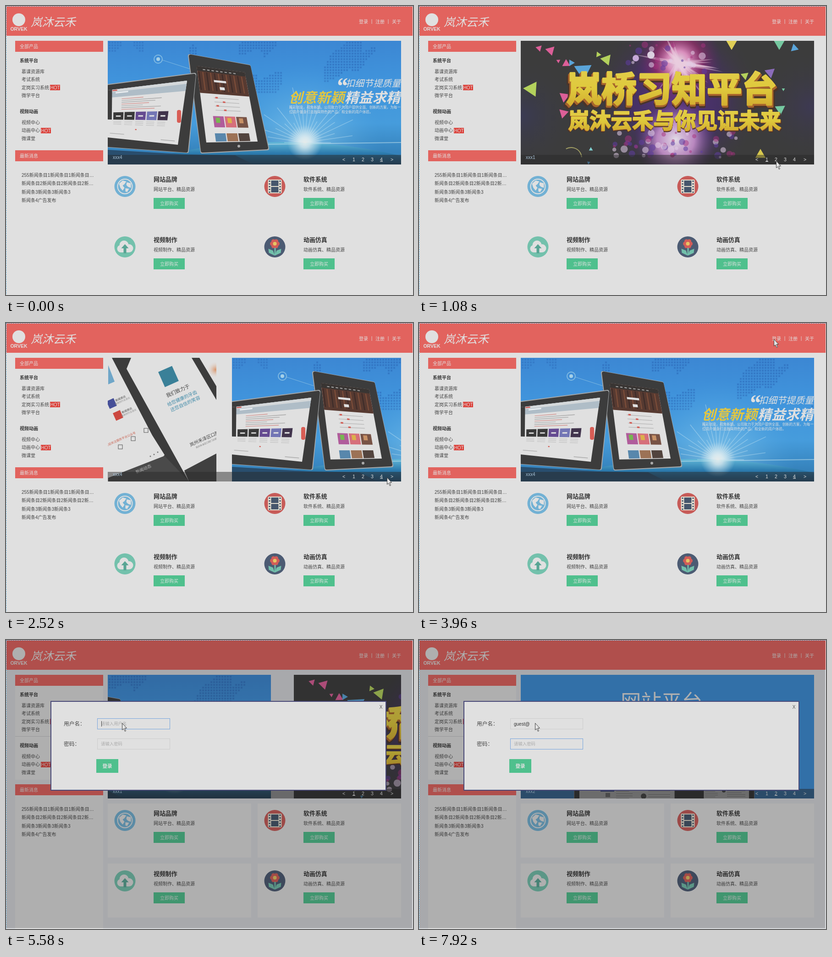
Write an HTML page with a canvas that moves like this. It is 888 px wide and 631 px high and loops after 8000 ms.

```html
<!DOCTYPE html>
<html lang="zh">
<head>
<meta charset="utf-8">
<title>网站首页</title>
<style>
html, body { margin: 0; width: 100%; height: 100%; overflow: hidden; background: #e0e0e0; }
canvas { display: block; }
</style>
</head>
<body>
<canvas id="stage" width="888" height="631"></canvas>
<script>
const c = document.getElementById('stage').getContext('2d');
const SANS = '"Liberation Sans", "Noto Sans CJK SC", "Noto Sans CJK", sans-serif';
const LIGHT = '#e0e0e0', DARK = '#3c3c3c', RED = '#e2635e', GREEN = '#4fc08d';
const LOOP = 8000, STEP = 180;

function rect(x, y, w, h, color) { c.fillStyle = color; c.fillRect(x, y, w, h); }
function round(x, y, w, h, r, color) {
  c.beginPath(); c.roundRect(x, y, w, h, r); c.fillStyle = color; c.fill();
}
function disc(x, y, r, color) {
  c.beginPath(); c.arc(x, y, r, 0, 7); c.fillStyle = color; c.fill();
}
function poly(pts, color) {
  c.beginPath();
  for (let i = 0; i < pts.length; i += 2) c.lineTo(pts[i], pts[i + 1]);
  c.closePath(); c.fillStyle = color; c.fill();
}
function line(x1, y1, x2, y2, color, w = 1) {
  c.beginPath(); c.moveTo(x1, y1); c.lineTo(x2, y2);
  c.strokeStyle = color; c.lineWidth = w; c.stroke();
}
// x is the left edge or centre, y the middle of the glyphs
function text(s, x, y, size, color, style = '', align = 'left') {
  c.font = `${style} ${size}px ${SANS}`;
  c.textAlign = align; c.fillStyle = color;
  c.fillText(s, x, Math.round(y + size * .37));
}
function tilted(s, x, y, size, color, angle, style) {
  c.save(); c.translate(x, y); c.rotate(angle);
  text(s, 0, 0, size, color, style, 'center');
  c.restore();
}
function glow(x, y, r, stops) {
  const g = c.createRadialGradient(x, y, 0, x, y, r);
  stops.forEach(([p, col]) => g.addColorStop(p, col));
  disc(x, y, r, g);
}
function fade(y1, y2, ...cols) {
  const g = c.createLinearGradient(0, y1, 0, y2);
  cols.forEach((col, i) => g.addColorStop(i / (cols.length - 1), col));
  return g;
}
function random(seed) {
  return () => (seed = (seed * 16807) % 2147483647) / 2147483647;
}
// patches in the unit square of a four-cornered screen
function screen([ax, ay, bx, by, cx, cy, dx, dy]) {
  const at = (u, v) => [
    (ax * (1 - u) + bx * u) * (1 - v) + (dx * (1 - u) + cx * u) * v,
    (ay * (1 - u) + by * u) * (1 - v) + (dy * (1 - u) + cy * u) * v];
  return (u, v, w, h, color) =>
    poly([...at(u, v), ...at(u + w, v), ...at(u + w, v + h), ...at(u, v + h)], color);
}
function tablet(pts, color) {
  poly(pts, color);
  c.lineJoin = 'round'; c.lineWidth = 8; c.strokeStyle = color; c.stroke();
}

// heavy extruded lettering, its sides leaning to the middle
function gold(s, x, y, size, depth) {
  c.lineJoin = 'round';
  for (let i = depth; i >= 0; i--) {
    const side = i > depth / 2 ? '#4b352b' : '#a8652c';
    const color = i ? side : fade(y - size / 2, y + size / 2, '#e2cc48', '#dfc93c', '#d2ac30');
    [...s].forEach((ch, n) => {
      const cx = x + n * size, px = cx + (cx + size / 2 - 556) * .002 * i, py = y + i * .5;
      text(ch, px, py, size, color, '900');
      c.strokeStyle = color; c.lineWidth = size / 22;
      c.strokeText(ch, px, Math.round(py + size * .37));
    });
  }
}
function tri(x, y, r, angle, color) {
  const pts = [];
  for (let i = 0; i < 3; i++) {
    const a = angle + i * 2.094;
    pts.push(x + r * Math.cos(a), y + r * Math.sin(a));
  }
  poly(pts, color);
}

function slideParty() {
  rect(222, 76, 640, 270, DARK);
  glow(225, 240, 130, [[0, 'rgba(58,58,92,.7)'], [1, 'rgba(60,60,60,0)']]);
  glow(855, 220, 130, [[0, 'rgba(62,56,92,.7)'], [1, 'rgba(60,60,60,0)']]);
  glow(560, 205, 190, [[0, 'rgba(92,52,130,.9)'], [.5, 'rgba(72,46,112,.75)'], [1, 'rgba(60,60,60,0)']]);
  glow(566, 122, 95, [[0, '#e4dde4'], [.25, '#d98fbd'], [.55, 'rgba(165,45,110,.6)'], [1, 'rgba(80,40,110,0)']]);
  glow(560, 292, 90, [[0, '#e2dce6'], [.45, 'rgba(205,150,208,.85)'], [1, 'rgba(90,50,130,0)']]);
  const rnd = random(77);
  for (let i = 0; i < 26; i++) {
    const a = rnd() * 6.28, r = 30 + rnd() * 70, x = 566, y = 124;
    poly([x + 5 * Math.sin(a), y - 5 * Math.cos(a), x + r * Math.cos(a), y + r * Math.sin(a), x - 5 * Math.sin(a), y + 5 * Math.cos(a)], 'rgba(232,205,222,.45)');
  }
  for (let i = 0; i < 80; i++) {
    const low = i > 24, x = low ? 425 + rnd() * 270 : 455 + rnd() * 170;
    const y = low ? 274 + rnd() * 56 : 84 + rnd() * 60;
    disc(x, y, 2 + rnd() * 6, ['rgba(225,205,232,.55)', 'rgba(165,50,125,.5)', 'rgba(95,60,160,.55)'][i % 3]);
  }
  disc(506, 107, 8, '#dcd0e0'); disc(473, 114, 7, '#c6aad8');
  const pink = '#dc5f98', lime = '#b3d15c', blue = '#5aa5da', mint = '#75c8a0';
  tri(262, 92, 8, 3.4, pink); tri(287, 97, 12, 5.5, pink); tri(304, 120, 5, 3.6, pink);
  tri(321, 126, 10, 2.6, pink); tri(332, 124, 8, 0, blue); tri(391, 106, 7, 2.2, lime);
  tri(409, 117, 14, 5.4, lime); tri(246, 181, 19, 5.3, lime); tri(358, 141, 22, 5.7, blue);
  tri(317, 198, 13, 3.8, pink); tri(315, 234, 12, 3.9, pink); tri(375, 313, 5, .5, '#7fd0d0');
  tri(682, 81, 15, 1.57, '#e0cf56'); tri(786, 82, 14, 1.57, mint); tri(819, 92, 10, 4.5, blue);
  tri(766, 145, 13, 3.5, '#8b6cba'); tri(788, 225, 13, 3.6, mint); tri(711, 152, 10, 5.6, lime);
  tri(745, 325, 13, 4.71, '#d8c94e'); tri(795, 182, 4, 1.57, mint); tri(370, 342, 4, 3.8, blue);
  c.beginPath(); c.arc(332, 332, 23, 4.2, 6.2); c.strokeStyle = '#a3a064'; c.lineWidth = 2; c.stroke();
  gold('岚桥习知平台', 322, 181, 76.5, 16);
  gold('岚沐云禾与你见证未来', 326, 250, 46.4, 5);
}

function spaceHead(x, y, w, h) {
  c.save(); c.beginPath(); c.rect(x, y, w, h); c.clip();
  rect(x, y, w, h, '#343238');
  const k = w / 341, rnd = random(19);
  glow(x + w * .3, y + h * .4, w * .22, [[0, 'rgba(75,60,95,.7)'], [1, 'rgba(50,50,50,0)']]);
  for (let i = 0; i < 50; i++) rect(x + rnd() * w, y + rnd() * h, 1, 1, '#8087a0');
  line(x + 60 * k, y + 30 * k, x + 290 * k, y + 8 * k, '#7a4550');
  disc(x + 66 * k, y + 72 * k, 26 * k, '#c98257');
  disc(x + 58 * k, y + 66 * k, 17 * k, '#dda476');
  c.beginPath(); c.ellipse(x + 75 * k, y + 38 * k, 22 * k, 12 * k, .75, 0, 7); c.fillStyle = '#4f94ce'; c.fill();
  line(x + 75 * k, y + 38 * k, x + 92 * k, y + 24 * k, LIGHT);
  poly([x + 155 * k, y + 55 * k, x + 185 * k, y + 27 * k, x + 218 * k, y + 42 * k, x + 235 * k, y + 72 * k, x + 175 * k, y + 74 * k], '#2d59a6');
  poly([x + 165 * k, y + 58 * k, x + 185 * k, y + 33 * k, x + 202 * k, y + 68 * k], '#4d87c9');
  poly([x + 270 * k, y + 9 * k, x + 308 * k, y + 2 * k, x + 300 * k, y + 15 * k, x + 276 * k, y + 20 * k], '#4d8c91');
  disc(x + 299 * k, y + 7 * k, 4 * k, '#d2ae47');
  disc(x + 52 * k, y + 12 * k, 10 * k, LIGHT);
  text('岚泽大学', x + 65 * k, y + 12 * k, 9 * k, LIGHT, 'bold');
  text('通信原理', x + 170 * k, y + 40 * k, 14 * k, '#62c653', 'bold');
  rect(x, y + 69 * k, w, 10 * k, '#2d2d30');
  for (let i = 0; i < 9; i++) text(['首页', '公告栏', '课程简介', '教学团队'][Math.min(i, 3)], x + (42 + i * 25) * k, y + 73 * k, 5 * k, LIGHT, 'bold');
  c.restore();
}

function paragraph(x, y, w, rows, gap = 5) {
  for (let i = 0; i < rows; i++) rect(x, y + i * gap, w * (i % 3 == 2 ? .8 : 1), 1, '#a0a0a0');
}

function slideSite() {
  rect(222, 76, 640, 270, '#3d8ed7');
  text('网站平台', 529, 135, 44.5, LIGHT, '300', 'center');
  text('专业是一枚优胜的标签，技术力量是获得认可的基础，效率是完成任务的保障，尽心是对客户的负责，成果是合作的意义。', 304, 170, 8.28, LIGHT);
  round(338, 189, 364, 180, 14, '#9a9da2');
  round(339, 190, 362, 180, 13, DARK);
  rect(350, 204, 340, 150, LIGHT);
  spaceHead(349, 204, 341, 79);
  ['课程简介', '公告新闻', '教学资源'].forEach((s, i) => {
    const x = 396 + i * 88;
    rect(x, 294, 3, 3, '#53b45a'); text(s, x + 4, 296, 4.5, '#555');
  });
  rect(396, 304, 30, 27, '#3c4f9f');
  text('通信原理', 411, 315, 5, LIGHT, 'bold', 'center');
  paragraph(430, 305, 36, 9);
  disc(490, 318, 6, '#555'); paragraph(500, 314, 48, 4);
  disc(490, 341, 6, '#555'); paragraph(500, 337, 48, 3);
  rect(407, 334, 10, 9, '#888');
  round(585, 239, 147, 120, 9, '#9a9da2');
  round(586, 240, 145, 120, 8, DARK);
  rect(596, 254, 124, 100, LIGHT);
  spaceHead(595, 254, 126, 56);
  paragraph(624, 322, 28, 6, 4);
  disc(665, 329, 4, '#555'); paragraph(672, 325, 40, 5, 4);
  round(557, 314, 65, 50, 9, '#a0a0a0');
  round(558, 315, 63, 50, 8, DARK);
}

function slidePhone() {
  rect(222, 76, 640, 270, LIGHT);
  c.save(); c.translate(404, 0);
  poly([-182, 76, -60, 76, 80, 346, -182, 346], '#c4c5c6');
  poly([222, 92, 236, 128, 222, 134], '#6fa6c8');
  poly([230, 76, 272, 76, 262, 100, 398, 346, 300, 346, 345, 288, 318, 245], DARK);
  poly([222, 338, 345, 290, 398, 346, 222, 346], '#4a4a4a');
  poly([264, 98, 322, 76, 408, 76, 458, 160, 458, 285, 388, 322], LIGHT);
  poly([404, 76, 421, 76, 458, 138, 458, 168], DARK);
  poly([388, 322, 458, 285, 458, 346, 398, 346], '#404040');
  glow(456, 102, 18, [[0, '#d9966c'], [1, 'rgba(224,215,210,0)']]);
  const a = -.42;
  c.save(); c.translate(353, 117); c.rotate(a); rect(-16, -18, 33, 36, '#3a8098'); c.restore();
  tilted('我们致力于', 374, 148, 11, '#444', a);
  tilted('给您健康的牙齿', 383, 164, 10, '#3f8aa8', a);
  tilted('还您自信的笑容', 390, 176, 10, '#3f8aa8', a);
  tilted('岚州禾泽区口腔', 432, 252, 10, '#444', a);
  tilted('岚州禾泽区口腔门诊部', 436, 262, 5, '#777', a);
  for (const [x, y, col] of [[229, 176, '#454f98'], [243, 202, '#cc4840']]) {
    c.save(); c.translate(x, y); c.rotate(a); rect(-8, -9, 17, 18, col); c.restore();
    tilted('新闻资讯', x + 20, y - 11, 6, '#444', a);
    tilted('最新的行业资讯', x + 24, y - 6, 5, '#888', a);
  }
  tilted('欢迎关注服务平台公众号', 249, 254, 6.5, '#c9604f', a);
  c.strokeStyle = '#555'; c.lineWidth = 1;
  for (let i = 0; i < 3; i++) c.strokeRect(244 + i * 28, 266 - i * 18, 9, 9);
  tilted('新闻动态', 299, 319, 9, '#bbb', a);
  disc(314, 291, 1.5, '#777'); disc(322, 287, 1.5, '#777'); disc(330, 282, 1.5, '#777');
  c.restore();
}

function slideTablet() {
  rect(222, 76, 640, 270, fade(76, 346, '#3c87d3', '#4094dc', '#469cdc', '#2f78ae'));
  for (let x = 400; x < 862; x += 6) {
    for (let y = 78; y < 190; y += 6) {
      if (Math.sin(x * .035 + 1) + Math.sin(y * .05 + x * .02) + Math.sin(x * .11 + y * .08) * .5 > .65) rect(x, y, 4, 4, 'rgba(40,100,180,.45)');
    }
  }
  for (let x = 224; x < 300; x += 6) for (let y = 78; y < 120; y += 6) {
    if (Math.sin(x * .09) + Math.sin(y * .1) > .5) rect(x, y, 4, 4, 'rgba(40,100,180,.35)');
  }
  glow(652, 297, 170, [[0, 'rgba(215,235,243,.8)'], [.25, 'rgba(140,203,236,.5)'], [1, 'rgba(80,165,225,0)']]);
  c.beginPath(); c.ellipse(600, 560, 560, 263, 0, 0, 7);
  c.fillStyle = fade(297, 346, '#62b7d8', '#2c7bae', '#214d70'); c.fill();
  for (let i = 0; i < 22; i++) {
    const a = Math.PI + i * .15, r = 45 + (i * 37 % 85);
    line(652, 298, 652 + r * Math.cos(a), 298 + r * Math.sin(a), 'rgba(220,240,245,.35)', 1.5);
  }
  glow(652, 298, 38, [[0, '#e4eaea'], [.3, 'rgba(222,236,240,.8)'], [1, 'rgba(200,230,240,0)']]);
  line(560, 302, 862, 298, 'rgba(210,235,240,.5)', 2);
  poly([222, 314, 390, 324, 500, 326, 540, 346, 222, 346], '#294e6e');
  c.beginPath(); c.arc(332, 116, 9, 0, 7); c.strokeStyle = '#80bae2'; c.lineWidth = 2; c.stroke();
  disc(332, 116, 4, '#a5d0e8'); line(341, 118, 400, 137, '#80bae2');

  tablet([401, 109, 530, 132, 570, 311, 428, 318], '#a5a8aa');
  tablet([403, 110, 530, 133, 568, 309, 429, 316], DARK);
  let p = screen([416, 131, 521, 145, 549, 296, 437, 298]);
  p(0, 0, 1, 1, LIGHT); p(0, 0, 1, .35, '#573a31'); p(0, 0, 1, .06, '#393533');
  for (let i = 0; i < 12; i++) p(.02 + i * .08, .07, .025, .24, i % 2 ? '#7a4c39' : '#3f2d2a');
  for (let i = 0; i < 8; i++) p(.12 + i * .09, .03, .05, .012, '#aaa');
  p(.32, .16, .25, .03, LIGHT); p(.42, .25, .1, .04, LIGHT);
  for (let i = 0; i < 4; i++) { p(.27, .4 + i * .055, .5, .008, '#b5b5b5'); p(.3 + i % 2 * .14, .39 + i * .055, .05, .02, '#d25a52'); }
  ['#b05c9b', '#d66f7b', '#785346'].forEach((col, i) => { p(.2 + i * .23, .65, .21, .15, col); p(.25 + i * .23, .67, .08, .07, ['#77b851', '#dbb14b', '#c79166'][i]); });
  ['#5887ac', '#9c7256', '#52443e'].forEach((col, i) => p(.19 + i * .23, .88, .21, .11, col));
  disc(508, 306, 3, '#aaa');

  tablet([210, 176, 411, 150, 395, 317, 210, 304], '#a5a8aa');
  tablet([210, 178, 410, 152, 393, 316, 210, 303], DARK);
  p = screen([222, 184, 395, 163, 375, 303, 222, 287]);
  p(0, 0, 1, 1, LIGHT); p(.05, 0, .95, .16, '#afbdc7'); p(.05, 0, .95, .05, '#d4d8da');
  p(0, 0, .055, .62, DARK); p(.1, .06, .16, .025, '#edf0f2'); p(.06, .01, .06, .02, '#c9504b');
  for (let i = 0; i < 7; i++) p(.18, .2 + i * .035, .28 + i * 7 % 4 * .08, .01, i % 3 ? '#a5a5a5' : '#cf8580');
  ['#393939', '#393939', '#654b91', '#7376b5', '#41344c'].forEach((col, i) => {
    p(.075 + i * .15, .47, .135, .15, col); p(.11 + i * .15, .535, .065, .025, LIGHT);
    for (let j = 0; j < 3; j++) p(.075 + i * .15, .65 + j * .03, .11, .008, '#bbb');
  });
  p(.38, .79, .02, .02, '#d25a52'); p(.03, .9, .2, .012, '#aaa'); p(.75, .94, .2, .012, '#aaa');
  round(373, 227, 9, 28, 4, '#d85d55');

  c.font = 'italic bold 50px "Liberation Serif", serif';
  c.textAlign = 'left'; c.fillStyle = LIGHT; c.fillText('“', 720, 191);
  text('扣细节提质量', 741, 169, 20, LIGHT, 'italic 300');
  text('创意新颖', 617, 200, 30.3, '#e3c63f', 'italic bold');
  text('精益求精', 739, 200, 30.3, LIGHT, 'italic bold');
  text('精彩创意，视角新颖。公司致力于为用户提供全面、创新的方案，为每一', 618, 221, 7.6, LIGHT);
  text('位用户量身打造独具特色的产品，和全新的用户体验。', 618, 231, 7.6, LIGHT);
}

const slides = [slideParty, slideSite, slidePhone, slideTablet];
const turns = [[500, 0], [1130, 1], [1850, 2], [2310, 3], [5413, 0], [6840, 1]];
const swing = t => .5 - .5 * Math.cos(Math.PI * Math.min(1, Math.max(0, t)));

function slide(i, dx) {
  if (Math.abs(dx) >= 640) return;
  c.save();
  c.translate(dx, 0);
  c.beginPath(); c.rect(222, 76, 640, 270); c.clip();
  slides[i]();
  c.restore();
}
function carousel(now) {
  let from = 3, to = 3, k = 1;
  for (const [at, n] of turns) if (now >= at) { from = to; to = n; k = (now - at) / 360; }
  c.save();
  c.beginPath(); c.rect(222, 76, 640, 270); c.clip();
  if (k < 1) slide(from, Math.round(-640 * swing(k)));
  slide(to, Math.round(730 * (1 - swing(k))));
  rect(222, 325, 640, 21, 'rgba(40,40,40,.48)');
  c.restore();
  text('xxx' + (to + 1), 233, 330, 10, '#a9c3d8');
  ['<', 1, 2, 3, 4, '>'].forEach((s, i) => text(s, [737, 759, 779, 799, 819, 842][i], 335, 10.5, LIGHT, '', 'center'));
  rect(756 + to * 20, 339, 6, 1, LIGHT);
}

function header() {
  rect(1, 1, 886, 64, RED);
  disc(28, 30, 14, LIGHT);
  text('ORVEK', 28, 50, 10.5, LIGHT, 'bold', 'center');
  text('岚沐云禾', 54, 35, 24.5, LIGHT, 'italic 500');
  text('登录', 770, 34, 10, LIGHT); text('注册', 806, 34, 10, LIGHT); text('关于', 842, 34, 10, LIGHT);
  text('|', 798, 33, 10, LIGHT, '', 'center'); text('|', 834, 33, 10, LIGHT, '', 'center');
}
function sidebar() {
  const item = (s, y) => text(s, 34, y, 10, '#444');
  const hot = (x, y) => { rect(x, y - 6, 22, 12, '#dc3f38'); text('HOT', x + 11, y, 10, LIGHT, '', 'center'); };
  rect(20, 76, 192, 24, RED); text('全部产品', 30, 88, 10, LIGHT);
  rect(20, 315, 192, 24, RED); text('最新消息', 30, 327, 10, LIGHT);
  text('系统平台', 30, 119, 10, '#333', 'bold');
  text('视频动画', 30, 230, 10, '#333', 'bold');
  ['慕课资源库', '考试系统', '定岗实习系统', '微学平台'].forEach((s, i) => item(s, 143.4 + i * 17.2));
  ['视频中心', '动画中心', '微课堂'].forEach((s, i) => item(s, 254.4 + i * 17.2));
  hot(96, 178); hot(76, 272);
  ['255新闻条目1新闻条目1新闻条目…', '新闻条目2新闻条目2新闻条目2新…', '新闻条3新闻条3新闻条3', '新闻条4广告发布'].forEach((s, i) => item(s, 369 + i * 18.5));
}

const icons = [
  (x, y) => {
    c.beginPath(); c.arc(x, y, 16, 0, 7); c.strokeStyle = LIGHT; c.lineWidth = 2; c.stroke();
    poly([x - 13, y - 6, x - 5, y - 13, x + 3, y - 11, x - 1, y - 5, x - 5, y - 2, x - 1, y + 3, x - 5, y + 9, x - 10, y + 3], LIGHT);
    poly([x + 4, y - 9, x + 13, y - 7, x + 13, y + 3, x + 7, y + 1, x + 3, y - 3], LIGHT);
    poly([x + 1, y + 4, x + 9, y + 5, x + 5, y + 12, x + 1, y + 11], LIGHT);
  },
  (x, y) => {
    round(x - 15, y - 15, 30, 30, 2, '#e5dfd0');
    rect(x - 8, y - 13, 16, 12, '#46566c'); rect(x - 8, y + 1, 16, 12, '#46566c');
    for (let i = 0; i < 5; i++) { rect(x - 13, y - 13 + i * 6, 3, 3, '#46566c'); rect(x + 10, y - 13 + i * 6, 3, 3, '#46566c'); }
  },
  (x, y) => {
    disc(x - 9, y + 4, 8, LIGHT); disc(x - 2, y - 4, 10, LIGHT); disc(x + 9, y + 3, 9, LIGHT);
    rect(x - 9, y + 2, 18, 10, LIGHT);
    poly([x, y - 6, x + 8, y + 3, x + 3, y + 3, x + 3, y + 14, x - 3, y + 14, x - 3, y + 3, x - 8, y + 3], '#58a594');
  },
  (x, y) => {
    rect(x - 1, y, 3, 18, '#72c0ab');
    poly([x, y + 19, x - 13, y + 13, x - 14, y + 4, x - 4, y + 8], '#72c0ab');
    poly([x, y + 19, x + 13, y + 13, x + 14, y + 4, x + 4, y + 8], '#72c0ab');
    for (let i = 0; i < 6; i++) disc(x + 6 * Math.cos(i * 1.047), y - 7 + 6 * Math.sin(i * 1.047), 4.5, '#d25d58');
    disc(x, y - 7, 4, '#e5c565');
  }
];
function services() {
  const names = ['网站品牌', '软件系统', '视频制作', '动画仿真'];
  const kinds = ['网站平台', '软件系统', '视频制作', '动画仿真'];
  names.forEach((s, i) => {
    const x = i % 2 * 327, y = i > 1 ? 132 : 0;
    disc(259.5 + x, 394 + y, 23, ['#72b1d4', '#c75b58', '#73c1ac', '#4c5b73'][i]);
    icons[i](259.5 + x, 394 + y);
    text(s, 322 + x, 378 + y, 12.9, '#333', 'bold');
    text(kinds[i] + '、精品资源', 322 + x, 400 + y, 10, '#444');
    rect(322 + x, 419 + y, 68, 24, GREEN);
    text('立即购买', 356 + x, 431 + y, 10, LIGHT, '', 'center');
  });
}

const keys = [5940, 6120, 6300, 6660, 7020, 7380];
function field(y, focus, value, hint, caret) {
  rect(199, y, 159, 24, focus ? '#78a5dd' : '#cdcdcd');
  rect(200, y + 1, 157, 22, LIGHT);
  text(value || hint, 207, y + 12, value ? 10 : 9.4, value ? '#333' : '#aaa');
  if (caret) rect(208 + (value ? c.measureText(value).width : 0), y + 6, 1, 12, '#444');
}
function dialog(now) {
  rect(1, 1, 885, 628, 'rgba(20,20,20,.24)');
  rect(97, 133, 733, 196, '#4a4a78');
  rect(99, 135, 729, 192, LIGHT);
  text('X', 818, 146, 10, '#555', '', 'center');
  text('用户名：', 126, 183, 11.7, '#444'); text('密码：', 126, 227, 11.7, '#444');
  const second = now >= 7740, blink = Math.floor((now - 5220) / 540) % 2 == 0;
  const typed = 'guest@'.slice(0, keys.filter(k => now >= k).length);
  field(171, now >= 5220 && !second, typed, '请输入用户名', now >= 5220 && !second && blink);
  field(215, second, '', '请输入密码', second && now < 7920);
  rect(197, 260, 48, 30, GREEN);
  text('登录', 221, 275, 10.5, LIGHT, 'bold', 'center');
}

const path = [[180, 76, 556], [540, 420, 470], [900, 760, 338], [1080, 779, 338], [1440, 779, 338], [1800, 800, 338],
  [2160, 819, 337], [2340, 831, 337], [2880, 831, 337], [3240, 812, 85], [3780, 774, 35], [4320, 774, 35], [5220, 253, 181]];
function pointer(now) {
  if (now < path[0][0]) return;
  let i = 0;
  while (i < path.length - 2 && now >= path[i + 1][0]) i++;
  const [t0, x0, y0] = path[i], [t1, x1, y1] = path[i + 1];
  const k = swing((now - t0) / (t1 - t0));
  c.save();
  c.translate(Math.round(x0 + (x1 - x0) * k) + .5, Math.round(y0 + (y1 - y0) * k) + .5);
  poly([0, 0, 0, 15, 3, 12, 6, 18, 8, 17, 5.5, 11, 10, 11], '#e4e4e4');
  c.strokeStyle = '#444'; c.lineWidth = 1; c.stroke();
  c.restore();
}

function draw(now) {
  const open = now >= 4140;
  rect(0, 0, 888, 631, LIGHT);
  if (open) {
    rect(0, 0, 888, 631, '#d7d9dc');
    rect(20, 100, 192, 205, LIGHT); rect(20, 339, 192, 292, LIGHT);
    rect(20, 210, 192, 1, '#c2c4c8');
    for (const x of [222, 549]) for (const y of [357, 488]) rect(x, y, 313, 118, LIGHT);
  }
  header(); sidebar(); carousel(now); services();
  if (open) dialog(now);
  c.setLineDash([3, 2]);
  line(0, .5, 888, .5, '#6ab4dc'); line(.5, 0, .5, 631, '#6ab4dc');
  c.setLineDash([]);
  pointer(now);
}

let shown = -1;
function tick() {
  const step = Math.floor(performance.now() % LOOP / STEP);
  if (step !== shown) { shown = step; draw(step * STEP); }
  requestAnimationFrame(tick);
}
tick();
</script>
</body>
</html>
```
